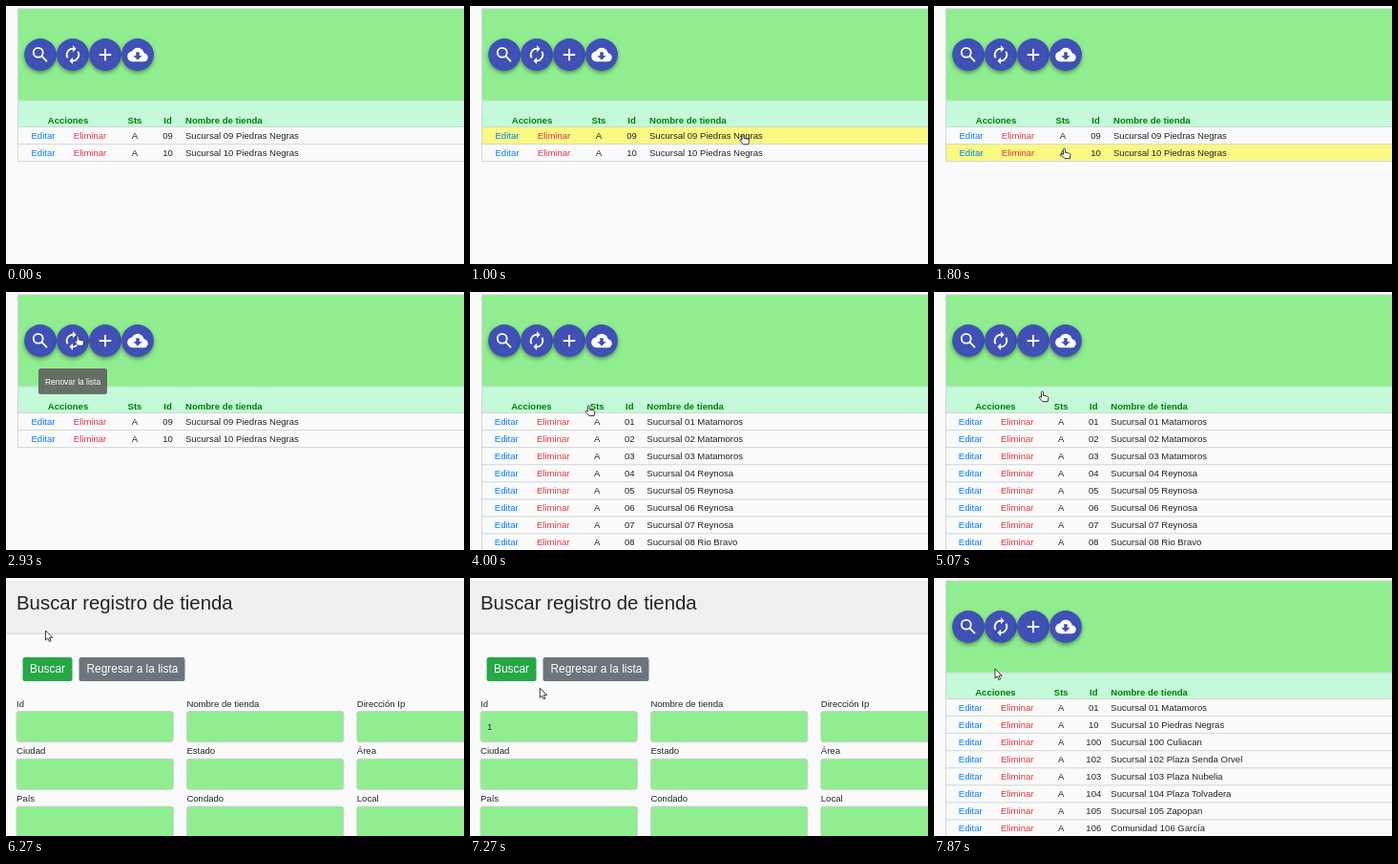
Write an HTML page that moves like this. It is 480 px wide and 270 px high and loops after 8000 ms.

```html
<!DOCTYPE html>
<html lang="es">
<head>
<meta charset="utf-8">
<style>
  html, body { margin: 0; width: 100%; height: 100%; overflow: hidden; background: #fafafa; }
  svg { display: block; width: 480px; height: 270px; }
  text { font: 9.55px "Liberation Sans", Arial, sans-serif; fill: #212529; white-space: pre; }
  .head { font-weight: bold; fill: #008000; }
  .mid { text-anchor: middle; }
  .edit { fill: #007bff; }
  .del { fill: #dc3545; }
  .title { font-size: 20.4px; }
  .btn { font-size: 11.9px; fill: #fff; }
  .tip text { font-size: 8.45px; fill: #fff; }
  .line { stroke: #d3d6d8; fill: none; }
  .fab { filter: drop-shadow(0 2px 2px rgba(0, 0, 0, .4)); }
  .icon { fill: #fff; }
  .stroke { fill: none; stroke: #fff; stroke-width: 2; }
  .pointer { fill: #fff; stroke: #222; stroke-width: .9; stroke-linejoin: round; }
</style>
</head>
<body>
<svg id="stage" viewBox="0 0 480 270"></svg>
<script>
const LOOP = 8000, TOP = 126.5, ROW = 18.07;
const RELOAD = 3470, SEARCH = 6270, RESULT = 7730;

const text = (x, y, s, cls = '') => `<text x="${x}" y="${y}" class="${cls}">${s}</text>`;
const rect = (x, y, w, h, fill, more = '') =>
  `<rect x="${x}" y="${y}" width="${w}" height="${h}" fill="${fill}" ${more}/>`;

const halfArrow = '<path class="stroke" d="M5.97 15.53A7 7 0 0 1 12 5"/><path d="M12 1v8l4-4z"/>';
const icons = [
  '<circle class="stroke" cx="9.5" cy="9.5" r="5.5"/><path class="stroke" d="M13.8 13.8l6 6"/>',
  halfArrow + `<g transform="rotate(180 12 12)">${halfArrow}</g>`,
  '<path class="stroke" d="M12 5v14M5 12h14"/>',
  '<path d="M19.35 10.04C18.67 6.59 15.64 4 12 4 9.11 4 6.6 5.64 5.35 8.04 2.34 8.36 0 10.91 0 14c0 3.31 2.69 6 6 6h13c2.76 0 5-2.24 5-5 0-2.64-2.05-4.78-4.65-4.96zM17 13l-5 5-5-5h3V9h4v4h3z"/>'
];
const fab = (icon, i) => `<g transform="translate(${36 + 34 * i} 51)">
  <circle class="fab" r="16.9" fill="#3f51b5"/>
  <g class="icon" transform="scale(.9) translate(-12 -12)">${icon}</g></g>`;

// Each store is "id name" or "id name kind"
function listPage(id, stores, [actions, edit, del, sts, num, name]) {
  const rows = stores.map(([n, place, kind = 'Sucursal'], i) => {
    const y = TOP + ROW * i + 12.4;
    return text(edit, y, 'Editar', 'edit') + text(del, y, 'Eliminar', 'del') +
      text(sts, y, 'A', 'mid') + text(num, y, n, 'mid') + text(name, y, `${kind} ${n} ${place}`) +
      `<path class="line" d="M12 ${TOP + ROW * (i + 1)}H480"/>`;
  }).join('');
  const bottom = TOP + ROW * stores.length;
  return `<g id="${id}">
    ${rect(12.5, 3, 470, 96, '#90ee90')}${rect(12.5, 99, 470, 27.5, '#c4f9d9')}
    ${rect(12.5, TOP, 470, ROW, '#faf982', 'class="hover"')}
    <path class="line" d="M481 2.8H12.5V${bottom}M12 99H480M12 ${TOP}H480"/>
    ${text(actions, 122.6, 'Acciones', 'head mid')}${text(sts, 122.6, 'Sts', 'head mid')}
    ${text(num, 122.6, 'Id', 'head mid')}${text(name, 122.6, 'Nombre de tienda', 'head')}
    ${rows}${icons.map(fab).join('')}</g>`;
}

function searchPage() {
  const labels = ['Id', 'Nombre de tienda', 'Dirección Ip', 'Ciudad', 'Estado', 'Área', 'País', 'Condado', 'Local'];
  const fields = labels.map((s, i) => {
    const x = 11 + 178.4 * (i % 3), y = 139.5 + 49.8 * Math.floor(i / 3);
    return text(x, y - 5, s) + rect(x, y, 164.3, 32, '#90ee90', 'rx="2.5" stroke="#c3d3ca"');
  }).join('');
  return `<g id="search">
    ${rect(0, 3, 480, 55, '#f0f0f0')}<path class="line" d="M0 58.3H480"/>
    ${text(11, 32.5, 'Buscar registro de tienda', 'title')}
    ${rect(17.5, 83, 52, 25, '#28a745', 'rx="2.5"')}${text(25, 99.3, 'Buscar', 'btn')}
    ${rect(76.5, 83, 111, 25, '#6c757d', 'rx="2.5"')}${text(84.5, 99.3, 'Regresar a la lista', 'btn')}
    ${fields}<text id="typed" x="18" y="159">1</text></g>`;
}

const tip = (id, x, s) => `<g id="${id}" class="tip">
  ${rect(x - 36, 80, 72, 27, '#616161', 'rx="2.5" fill-opacity=".9"')}${text(x, 96.6, s, 'mid')}</g>`;

const places = ['Matamoros', 'Matamoros', 'Matamoros', 'Reynosa', 'Reynosa', 'Reynosa', 'Reynosa',
  'Rio Bravo', 'Piedras Negras', 'Piedras Negras'];
const all = places.map((p, i) => [String(i + 1).padStart(2, '0'), p]);
const found = [all[0], all[9], ['100', 'Culiacan'], ['102', 'Plaza Senda Orvel'], ['103', 'Plaza Nubelia'],
  ['104', 'Plaza Tolvadera'], ['105', 'Zapopan'], ['106', 'García', 'Comunidad']];
const wide = [65, 26.5, 70.8, 135, 169.6, 188], tight = [64.4, 25.8, 70, 133.2, 167.3, 185.3];

const stage = document.getElementById('stage');
stage.innerHTML = listPage('few', all.slice(8), wide) + listPage('all', all, tight) +
  listPage('found', found, tight) + searchPage() +
  tip('tipSearch', 36, 'Buscar registro') + tip('tipReload', 70, 'Renovar la lista') +
  `<path id="hand" class="pointer" d="M2.5 1.3c0-1.6 2-1.6 2 0v3l4 .8c1.2.3 1.5 1 1.4 2l-.6 3.6H4L.5 6.8C0 5.7 1 5 1.8 5.7l.7.7z"/>
   <path id="arrow" class="pointer" d="M0 0v10l2.3-2.1 1.7 3.7 1.7-.8L4 7.3h3.2z"/>`;
const $ = id => document.getElementById(id);
const show = (el, on) => el.setAttribute('visibility', on ? 'inherit' : 'hidden');

// Pointer path as [time, x, y]
const path = [[330, 480, 138], [900, 300, 133], [1300, 190, 140], [1800, 133, 149], [2000, 133, 149],
  [2300, 110, 125], [2700, 71.5, 45.5], [3580, 71.5, 45.5], [3950, 120, 118], [4250, 130, 129.5],
  [4700, 130, 129.5], [5070, 110, 104], [5400, 95, 85], [5750, 34, 46], [6120, 34, 46], [6270, 41.5, 55],
  [6650, 90, 152], [7050, 90, 152], [7420, 64, 95], [8000, 64, 95]];
const clamp = v => Math.max(0, Math.min(1, v));
const ramp = (t, a, b) => { const u = clamp((t - a) / (b - a)); return u * u * (3 - 2 * u); };
const fade = (t, a, b) => clamp((t - a) / 130) * clamp((b - t) / 130);

function pointer(t) {
  const i = path.findIndex(p => p[0] > t);
  if (i < 1) return [path[0][1], path[0][2]];
  const [a, x, y] = path[i - 1], [b, x2, y2] = path[i], u = ramp(t, a, b);
  return [x + (x2 - x) * u, y + (y2 - y) * u];
}

function draw(t) {
  const page = t < RELOAD ? 'few' : t < SEARCH ? 'all' : t < RESULT ? 'search' : 'found';
  for (const id of ['few', 'all', 'search', 'found']) show($(id), id === page);

  const scroll = 25.5 * (ramp(t, 4330, 4480) - ramp(t, 4680, 4850));
  $('all').setAttribute('transform', `translate(0 ${-scroll})`);

  const [x, y] = pointer(t), row = Math.floor((y + scroll - TOP) / ROW);
  for (const hover of document.querySelectorAll('.hover')) {
    const on = t >= 330 && row >= 0 && hover.parentNode.id === page;
    hover.setAttribute('y', TOP + ROW * row);
    show(hover, on);
  }

  const arrow = t >= SEARCH;
  show($('hand'), t >= 330 && !arrow);
  show($('arrow'), arrow);
  $(arrow ? 'arrow' : 'hand').setAttribute('transform', `translate(${x} ${y})`);

  $('tipReload').setAttribute('opacity', fade(t, 2750, 3330));
  $('tipSearch').setAttribute('opacity', fade(t, 5780, 6200));
  show($('typed'), page === 'search' && t >= 6930);
}

const start = performance.now();
function tick() {
  draw((performance.now() - start) % LOOP);
  requestAnimationFrame(tick);
}
tick();
</script>
</body>
</html>
```
